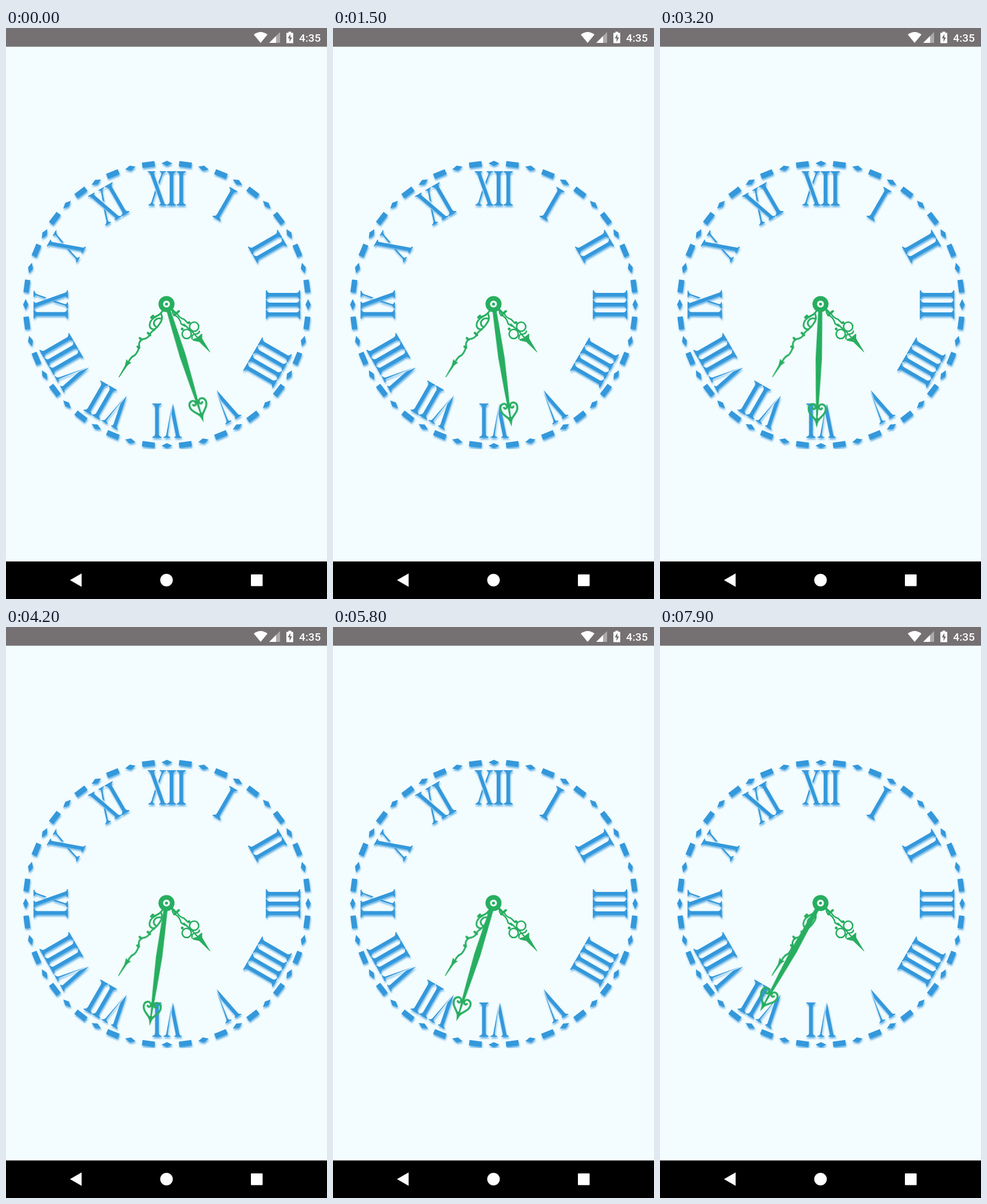
An HTML page that plays this animation: 561x998 px, repeating every 8 s.

```html
<!DOCTYPE html>
<html lang="en">
<head>
<meta charset="utf-8">
<title>Clock</title>
<style>
  html, body { margin: 0; width: 100%; height: 100%; overflow: hidden; background: #f3fcff; }
  svg { display: block; width: 561px; height: 998px; }
  .dial { fill: #3498db; filter: drop-shadow(1px 3px 1.8px rgba(52, 152, 219, .72)); }
  .hand { fill: #27ae60; stroke: #27ae60; stroke-linecap: round; stroke-linejoin: round; }
  .line { fill: none; }
  .turn { transform-origin: 280.5px 482.5px; animation: 8s steps(80) infinite; }
  #second { animation-name: second; }
  #minute { animation-name: minute; }
  @keyframes second {
    from { transform: rotate(-17.4deg); animation-timing-function: steps(58); }
    72.5% { transform: rotate(17.4deg); animation-timing-function: steps(22); }
    to { transform: rotate(29.7deg); }
  }
  @keyframes minute { from { transform: rotate(0deg); } to { transform: rotate(.8deg); } }
  .time { font: 500 19.2px Roboto, sans-serif; fill: #fff; }
</style>
</head>
<body>
<svg viewBox="0 0 561 998">
  <defs>
    <clipPath id="face"><rect x="20" y="228" width="520" height="508"/></clipPath>
    <path id="I" d="M.5 0H16.5V1.5Q11.6 3 11.6 7V53Q11.6 57 16.5 58.5V60H.5V58.5Q5.4 57 5.4 53V7Q5.4 3 .5 1.5Z"/>
    <path id="V" d="M0 0H13V1.5Q10 2 10.6 5L18 42 15.5 60 4.4 5Q3.400 2 0 1.5Z
      M20 0H32V1.5Q28 2 27 6L17 59 24.500 6Q25 2 20 1.5Z"/>
    <path id="X" d="M0 0H13V1.5Q10 2 11 5L29 56Q30 58 33 58.5V60H20V58.5Q23 58 22.5 55L4.500 5Q3 2 0 1.5Z
      M21 0H32V1.5Q28 2 26 6L20 23 18.6 19 24 5Q25 2 21 1.5Z
      M1 60H12V58.5Q8 58 9 54L14.4 37 13 33 6.500 54Q4 58 1 58.5Z"/>
    <path id="lobe" d="M0 207C-4 198-15.5 193-15 183C-14.5 174-4 172.5-3 179.5C-2.6 184-7 185.5-8.4 182"/>
  </defs>

  <rect width="561" height="998" fill="#f3fcff"/>
  <g clip-path="url(#face)"><g class="dial" id="dial"></g></g>

  <g class="hand" stroke-width="2.6">
    <path class="line" stroke-width="4" d="M289 491L297 499M294 502L302 495"/>
    <path class="line" d="M291 494Q290 501 297 503Q304 508 306 517L313 521M299 499Q303 507 311 509L318 516M311 518L322 528"/>
    <circle class="line" cx="328.8" cy="522" r="8"/>
    <circle class="line" cx="315.8" cy="534.8" r="8"/>
    <path class="line" d="M323 528L338 545M325 543Q324 535 331 535Q338 534 338 530M327 545Q335 543 342 536"/>
    <circle cx="320" cy="515" r="1.2"/>
    <circle cx="308" cy="526" r="1.2"/>
    <path stroke-width="1" d="M328 546Q336 544 342 535L342.500 543 356.500 566.500 338 548.500Z"/>
  </g>

  <g class="hand turn" id="minute" stroke-width="3">
    <path class="line" d="M276 492L269 500Q264 504 256 506M263 504Q251 510 251 519Q251 526 259 527
      M271 499Q275 509 269 516Q265 523 259 527M271 508Q263 506 259 513Q257 519 262 522
      M260 527Q252 532 250 538Q247 543 238 544Q231 549 233 556Q231 566 225 572Q218 575 214 584"/>
    <path class="line" stroke-width="4" d="M254 506L257 503M248 533L252 537M234 542L237 545M230 557L233 559"/>
    <path stroke-width="1.4" d="M211 580Q213 585 218 585Q213 587 210 592L197.500 610 208.500 590Z"/>
  </g>

  <g class="hand turn" id="second">
    <g transform="translate(280.5 482.5)">
      <path stroke="none" d="M-3.5 10H3.5Q4.8 60 5.5 95Q4 145 1.5 195L0 216.5-1.5 195Q-4 145-5.5 95Q-4.8 60-3.5 10Z"/>
      <path stroke="none" d="M-6 198Q-2 202 0 197Q2 202 6 198Q2 206 0 216.5Q-2 206-6 198Z"/>
      <g class="line" stroke-width="3.4">
        <use href="#lobe"/><use href="#lobe" transform="scale(-1 1)"/>
      </g>
    </g>
  </g>
  <g fill="#27ae60">
    <circle cx="280.5" cy="482.5" r="14"/>
    <circle cx="280.5" cy="482.5" r="6" fill="#f3fcff"/>
    <circle cx="280.5" cy="482.5" r="2.6"/>
  </g>

  <rect width="561" height="32.7" fill="#757173"/>
  <g fill="#fff">
    <path d="M433 11.5Q445 2.5 457 11.5L445 26Z"/>
    <path d="M479 7V26H460Z" opacity=".4"/>
    <path d="M472 14V26H460Z"/>
    <path d="M490 8.5H493.5V6.5H498.5V8.5H502V26.5H490Z"/>
    <path d="M497 10.5L492.5 18H495.5V24.5L500 16.5H497Z" fill="#757173"/>
  </g>
  <text class="time" x="512.3" y="24">4:35</text>

  <rect y="932.4" width="561" height="66"/>
  <g fill="#fff">
    <path d="M111.8 965L132.2 953.2V976.800Z"/>
    <circle cx="280.5" cy="965" r="11"/>
    <rect x="428" y="955" width="20.5" height="20.5" rx="1"/>
  </g>
</svg>
<script>
  const dial = document.getElementById('dial');
  const widths = { I: 17, V: 32, X: 33 };
  const gap = 3; // space between a V and the strokes after it
  const numerals = ['XII', 'I', 'II', 'III', 'IIII', 'V', 'VI', 'VII', 'VIII', 'IX', 'X', 'XI'];
  const diamond = '<path d="M-9.5 0L0-4.5 9.5 0 0 4.5Z"/>';
  const dash = '<rect x="-11" y="-4.7" width="22" height="9.4"/>';

  const place = (angle, radius, shape) =>
    `<g transform="translate(281.2 483.2) rotate(${angle}) translate(0 ${-radius})">${shape}</g>`;

  function numeral(text) {
    const glyphs = [...text];
    const advance = (c, i) => widths[c] + (c === 'V' && i < glyphs.length - 1 ? gap : 0);
    let x = -glyphs.reduce((sum, c, i) => sum + advance(c, i), 0) / 2;
    return glyphs.map((c, i) => {
      const glyph = `<use href="#${c}" x="${x}"/>`;
      x += advance(c, i);
      return glyph;
    }).join('');
  }

  let marks = '';
  for (let i = 0; i < 48; i++) marks += place(i * 7.5, 246.8, i % 2 ? dash : diamond);
  numerals.forEach((text, i) => marks += place(i * 30, 233, numeral(text)));
  dial.innerHTML = marks;
</script>
</body>
</html>
```
